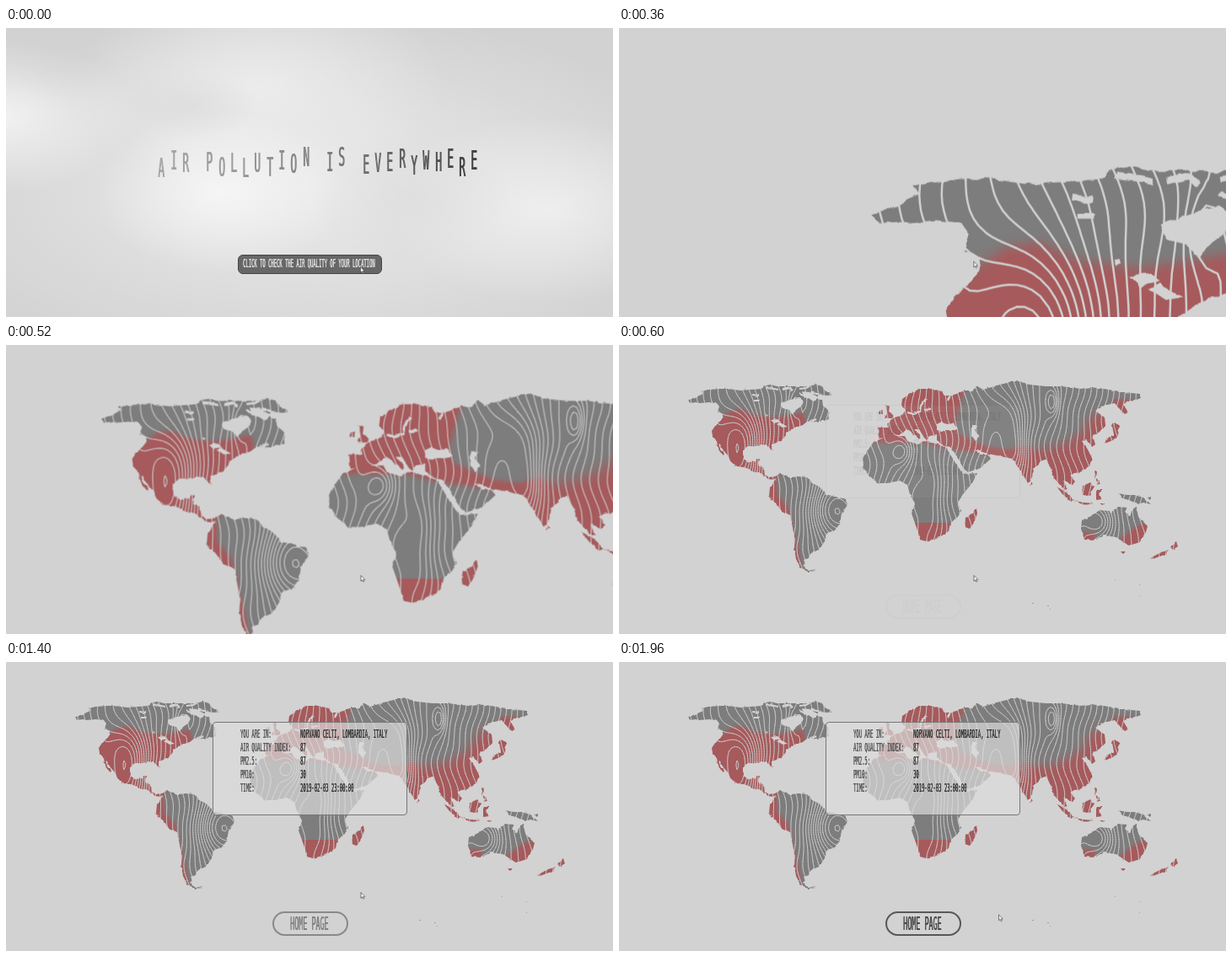
Recreate the animation shown at these times as an HTML page. Size 720x343 px, loop 2000 ms.

```html
<!DOCTYPE html>
<html lang="en">
<head>
<meta charset="utf-8">
<title>Air pollution is everywhere</title>
<style>
html, body { margin: 0; width: 100%; height: 100%; overflow: hidden; background: #d2d2d2; }
#stage { position: absolute; left: 0; top: 0; width: 720px; height: 343px; overflow: hidden; background: #d2d2d2; }
#stage div, #stage span, #stage svg { position: absolute; box-sizing: border-box; }

/* tall, narrow lettering */
.ink {
  font-family: "DejaVu Sans Mono", monospace; font-size: 13.5px; line-height: 1;
  white-space: pre; text-transform: uppercase; text-shadow: .04em 0 currentColor;
  transform: translateY(-50%) scaleX(.41); transform-origin: 0 50%;
}

#map { left: 0; top: 0; width: 720px; height: 343px; }
#world { transform-box: view-box; transform-origin: -21px -8px; animation: zoom 2s infinite; }
@keyframes zoom {
  0%, 18% { transform: scale(3.12); animation-timing-function: steps(4); }
  26% { transform: scale(1.302); animation-timing-function: step-end; }
  28%, 100% { transform: scale(1); }
}

#info {
  left: 245px; top: 71px; width: 231px; height: 111px; border: 1.3px solid #777; border-radius: 4px;
  background: rgba(220, 220, 220, .7); color: #555; animation: panel 2s linear infinite;
}
#info .value { color: #333; }
@keyframes panel { 0%, 28% { opacity: 0; } 54%, 100% { opacity: 1; } }

#home {
  left: 315.5px; top: 295.5px; width: 90px; height: 29.5px; border: 2px solid #555; border-radius: 15px;
  color: #444; animation: home 2s linear infinite;
}
#home .ink { left: 19.5px; top: 13.5px; font-size: 20.5px; }
@keyframes home { 0%, 28% { opacity: 0; } 100% { opacity: 1; } }

#intro { left: 0; top: 0; width: 720px; height: 343px; overflow: hidden; background: #d2d2d2; animation: intro 2s step-end infinite; }
@keyframes intro { 0% { visibility: visible; } 18%, 100% { visibility: hidden; } }
#clouds {
  left: -40px; top: 0; width: 800px; height: 343px; animation: drift 2s linear infinite;
  background:
    radial-gradient(ellipse 80px 40px at 262px 92px, rgba(212,212,212,.4), transparent),
    radial-gradient(ellipse 70px 45px at 105px 45px, rgba(210,210,210,.35), transparent),
    radial-gradient(ellipse 120px 80px at 520px 200px, rgba(214,214,214,.4), transparent),
    radial-gradient(ellipse 150px 95px at 295px 195px, rgba(247,247,247,.9), transparent),
    radial-gradient(ellipse 170px 90px at 30px 105px, rgba(244,244,244,.95), transparent),
    radial-gradient(ellipse 220px 130px at 340px 70px, rgba(240,240,240,.8), transparent),
    radial-gradient(ellipse 190px 110px at 680px 215px, rgba(240,240,240,.9), transparent),
    radial-gradient(ellipse 480px 210px at 400px 190px, rgba(236,236,236,.95), transparent),
    linear-gradient(#d2d2d2, #d4d4d4);
}
@keyframes drift { 0% { transform: none; } 18%, 100% { transform: translateX(14px); } }
#title .ink { top: 0; font-size: 31.5px; transform-origin: 50% 50%; animation: bob 2s linear infinite; }
@keyframes bob {
  0% { transform: translate(-50%, calc(var(--from) - 50%)) scaleX(.41); }
  16%, 100% { transform: translate(-50%, calc(var(--to) - 50%)) scaleX(.41); }
}
#check {
  left: 274.5px; top: 268.5px; width: 171px; height: 23.5px; border: 1.5px solid #454545; border-radius: 6px;
  background: #676767; color: #e2e2e2;
}
#check .ink { left: 5px; top: 10.5px; }

#cursor { left: 0; top: 0; width: 8px; height: 10px; animation: point 2s linear infinite; }
@keyframes point {
  0% { transform: translate(420px, 283px); }
  16% { transform: translate(420px, 278px); }
  22% { transform: translate(421px, 274px); }
  26%, 88% { transform: translate(420.5px, 273px); }
  98%, 100% { transform: translate(450px, 299.5px); }
}
</style>
</head>
<body>
<div id="stage">
  <svg id="map" viewBox="0 0 720 343">
    <defs>
      <filter id="rough" filterUnits="userSpaceOnUse" x="70" y="30" width="610" height="290" color-interpolation-filters="sRGB">
        <feTurbulence type="fractalNoise" baseFrequency=".17" numOctaves="2" seed="4"/>
        <feDisplacementMap in="SourceGraphic" scale="3" xChannelSelector="R" yChannelSelector="G"/>
      </filter>
      <filter id="soft" filterUnits="userSpaceOnUse" x="70" y="30" width="610" height="290">
        <feGaussianBlur stdDeviation="2.2"/>
      </filter>
      <filter id="softer" filterUnits="userSpaceOnUse" x="70" y="30" width="610" height="290">
        <feGaussianBlur stdDeviation="6"/>
      </filter>
      <mask id="land" maskUnits="userSpaceOnUse" x="70" y="30" width="610" height="290">
        <g filter="url(#rough)">
          <g fill="#fff">
            <!-- Canada and Alaska -->
            <path d="M82 66L88 63 93 61 100 58 98 55 106 53 120 52 129 52 144 54 156 53 169 52 174 48 180 47 187 49 200 49 214 49 223 49 234 47 241 49 244 54 252 58 248 60 238 59 234 63 241 66 242 72 248 77 249 89 243 90 234 91 225 92 232 87 223 91 218 95 212 97 114 97 122 87 123 82 117 79 119 73 116 69 106 68 96 69 91 68 85 69Z"/>
            <!-- United States to Panama -->
            <path d="M114 96L212 96 209 99 204 100 198 104 198 107 194 112 187 116 181 118 181 122 183 125 180 124 177 120 169 118 162 120 157 119 151 121 147 126 147 130 150 137 156 139 162 138 163 135 167 135 165 140 166 144 172 145 173 154 178 157 185 156 190 153 189 158 184 160 177 159 168 152 159 149 148 145 139 144 132 138 129 131 123 124 120 118 118 117 120 123 125 129 124 131 120 127 117 120 116 114 111 108 110 102Z"/>
            <!-- South America -->
            <path d="M190 153L196 154 204 157 214 156 223 157 229 164 239 169 245 177 256 180 269 183 271 190 264 200 262 212 256 220 247 223 244 233 237 243 230 246 226 248 225 253 219 255 221 259 218 262 222 266 233 268 224 269 215 264 210 254 207 240 208 228 206 217 203 202 193 197 186 189 178 179 179 169 185 161Z"/>
            <!-- Africa -->
            <path d="M302 115L314 110 327 108 339 108 342 114 355 118 362 114 375 117 387 120 393 130 401 143 408 153 425 152 419 164 408 177 402 187 405 198 401 204 393 212 391 221 379 229 364 233 357 231 353 217 347 200 351 189 345 177 342 166 333 161 318 164 306 164 296 154 289 146 290 135 295 125Z"/>
            <path d="M424 194L418 201 411 205 410 216 416 218 421 211 425 200Z"/>
            <!-- Europe and Turkey -->
            <path d="M308 111L307 98 319 98 318 92 325 87 335 83 341 78 335 72 336 64 345 58 356 52 371 52 383 55 386 60 395 60 410 54 430 60 430 125 394 122 383 118 377 114 377 106 369 108 366 114 362 110 356 100 349 100 358 107 356 112 352 108 341 100 337 104 327 108 322 111 314 110Z"/>
            <path d="M316 71L321 73 320 78 326 84 324 87 315 87 318 81ZM309 78L314 77 313 82 308 82Z"/>
            <!-- Asia -->
            <path d="M410 54L419 54 425 49 432 53 448 48 464 44 475 43 487 47 506 49 525 49 548 52 560 50 575 52 600 56 618 58 620 63 608 66 598 70 604 80 600 82 592 74 588 69 575 72 565 78 576 86 577 95 570 103 562 108 565 118 561 121 555 112 549 114 556 124 561 134 558 144 548 151 540 152 535 155 541 162 537 167 531 162 527 161 532 171 528 172 522 165 516 158 512 146 506 136 502 137 491 147 490 157 485 164 478 152 471 141 466 135 448 131 437 129 425 125 414 119 405 120Z"/>
            <path d="M393 121L400 120 414 119 421 123 429 130 438 130 441 135 429 146 414 151 406 144Z"/>
            <!-- Pacific islands -->
            <path d="M587 91L593 96 592 107 586 113 576 117 579 111 587 106 585 96ZM488 162L491 165 488 167Z"/>
            <path d="M519 168L529 174 540 184 536 186 526 177ZM540 185L552 187 563 188 552 190ZM549 168L559 163 563 168 559 179 550 178ZM566 172L574 172 569 176 573 183 566 184ZM564 149L567 150 566 157 571 165 567 165ZM570 188L577 188 574 190Z"/>
            <path d="M592 176L602 178 611 178 622 181 631 189 622 187 615 189 605 184 597 182ZM626 181L632 180 630 184Z"/>
            <path d="M549 208L560 203 570 196 582 197 583 200 592 192 603 193 600 198 607 204 610 194 613 193 617 205 627 215 625 222 618 234 605 238 597 234 590 228 575 226 563 232 552 231 548 218ZM595 245L601 245 598 248Z"/>
            <path d="M661 234L663 239 657 243 654 240ZM652 243L647 249 633 254 630 253 641 247Z"/>
          </g>
          <!-- inland water and straits -->
          <path d="M191 69L203 65 214 63 219 66 217 72 210 77 207 82 204 81 202 77 194 75ZM216 55L226 56 236 62 231 67 222 63ZM180 89L188 88 191 91 184 93ZM187 94L191 92 200 97 193 98Z"/>
          <path d="M377 94L383 91 389 94 396 93 402 99 397 102 384 102 377 101ZM418 95L426 95 422 101 427 109 423 114 418 107Z"/>
          <g fill="none" stroke="#000" stroke-width="2.2">
            <path d="M158 59L166 60M160 66L166 66M174 51L184 52 189 53M194 53L203 51 206 54M214 52L222 51 227 48M214 58L222 61 229 57 240 59M226 92L234 88M175 83L176 85"/>
            <path d="M342 80L350 82 357 79 358 72 364 64M362 77L370 76M393 60L390 66M395 125L403 139 411 152"/>
          </g>
        </g>
        <path d="M588 278h1v1h-1zM490 306h2v1h-2zM508 309h2v1h-2zM617 284h1v1h-1zM617 297h1v1h-1zM511 313h1v1h-1z" fill="#999"/>
      </mask>
    </defs>
    <g id="world">
      <g mask="url(#land)">
        <path d="M70 30H680V320H70Z" fill="#7d7d7d"/>
        <g fill="#a65a5c" filter="url(#soft)">
          <path d="M90 110L118 88 133 78 146 76 160 83 183 86 205 83 218 80 223 98 200 125 190 155 170 160 100 150Z"/>
          <path d="M176 155L187 158 188 178 201 193 206 215 212 240 217 266 200 266 190 205 170 180Z"/>
          <path d="M300 45H412L405 70 399 92 402 105 418 112 440 121 465 124 480 119 500 132 500 172 470 165 440 131 412 126 392 124 360 116 300 116Z"/>
          <path d="M588 64L612 66V125L580 192H500V160L530 145 570 112Z"/>
          <path d="M545 223L565 222 563 238H545ZM590 234L612 216 632 208 632 258H590ZM625 230H670V260H625Z"/>
        </g>
        <path d="M470 122L505 124 528 117 548 105 563 82 584 76 600 130 540 200 500 195Z" fill="#a65a5c" filter="url(#softer)"/>
        <path d="M340 211H430V240H340ZM408 190H430V222H408Z" fill="#a65a5c"/>
        <path id="contours" fill="none" stroke="#d0d0d0" stroke-width=".8" stroke-linecap="round"/>
      </g>
    </g>
  </svg>

  <div id="info"></div>
  <div id="home"><span class="ink">Home page</span></div>

  <div id="intro">
    <div id="clouds"></div>
    <div id="title"></div>
    <div id="check"><span class="ink">Click to check the air quality of your location</span></div>
  </div>

  <svg id="cursor" viewBox="0 0 8 10"><path d="M.5.5V7.2L2.1 5.8 3.2 8.2 4.3 7.7 3.2 5.4H5.2Z" fill="#fff" stroke="#444" stroke-width=".7"/></svg>
</div>
<script>
function addInk(parent, text, left, top) {
  const el = document.createElement('span');
  el.className = 'ink';
  el.textContent = text;
  el.style.left = left + 'px';
  if (top !== undefined) el.style.top = top + 'px';
  parent.append(el);
  return el;
}

// Title: every letter bobs between two heights.
const words = 'AIR POLLUTION IS EVERYWHERE';
const from = [167,158,161,0,160,166,161,167,161,166,158,162,154,0,160,154,0,163,161,160,156,164,158,160,156,166,158];
const to = [165,158,160,0,160,163,165,167,161,164,160,159,156,0,161,154,0,160,159,161,157,160,160,162,156,165,161];
const title = document.getElementById('title');
[...words].forEach((ch, i) => {
  if (ch === ' ') return;
  const el = addInk(title, ch, 184.3 + 14.27 * i);
  const grey = Math.round(165 - 100 * (i / 26) ** 1.5);
  el.style.color = `rgb(${grey},${grey},${grey})`;
  el.style.setProperty('--from', from[i] + 'px');
  el.style.setProperty('--to', to[i] + 'px');
});

const info = document.getElementById('info');
[
  ['You are in:', 'Norvano Celti, Lombardia, Italy'],
  ['Air Quality Index:', '87'],
  ['PM2.5:', '87'],
  ['PM10:', '30'],
  ['Time:', '2019-02-03 23:00:00']
].forEach(([label, value], i) => {
  const y = 13.5 + 16.2 * i;
  addInk(info, label, 32, y);
  addInk(info, value, 103, y).classList.add('value');
});

// Contour lines of a sloping field with hills and pits: x, y, x radius, y radius, height.
const hills = [
  [146, 128, 23, 46, 7.5], [252, 192, 25, 36, -7], [514, 68, 7, 16, 4], [468, 124, 15, 36, 5],
  [336, 126, 13, 16, 4], [208, 72, 7, 15, -3], [570, 210, 16, 18, 4], [372, 178, 14, 40, 2.5], [460, 80, 22, 34, 2]
];
const height = (x, y) => hills.reduce(
  (h, [cx, cy, rx, ry, a]) => h + a * Math.exp(-(((x - cx) / rx) ** 2) - ((y - cy) / ry) ** 2),
  .6 * Math.sin(y / 19 + x / 47) + .2 * Math.sin(y / 8 - x / 31) - x / 7.5
);

function contourPath(step) {
  let d = '';
  for (let y = 40; y < 272; y += step) {
    for (let x = 80; x < 664; x += step) {
      const corners = [[x, y], [x + step, y], [x + step, y + step], [x, y + step]]
        .map(([px, py]) => [px, py, height(px, py)]);
      const hs = corners.map(c => c[2]);
      for (let level = Math.ceil(Math.min(...hs)); level < Math.max(...hs); level++) {
        const cuts = [];
        corners.forEach((a, i) => {
          const b = corners[(i + 1) % 4];
          if ((a[2] < level) === (b[2] < level)) return;
          const k = (level - a[2]) / (b[2] - a[2]);
          cuts.push((a[0] + k * (b[0] - a[0])).toFixed(1) + ' ' + (a[1] + k * (b[1] - a[1])).toFixed(1));
        });
        for (let i = 0; i + 1 < cuts.length; i += 2) d += `M${cuts[i]}L${cuts[i + 1]}`;
      }
    }
  }
  return d;
}
document.getElementById('contours').setAttribute('d', contourPath(3));
</script>
</body>
</html>
```
